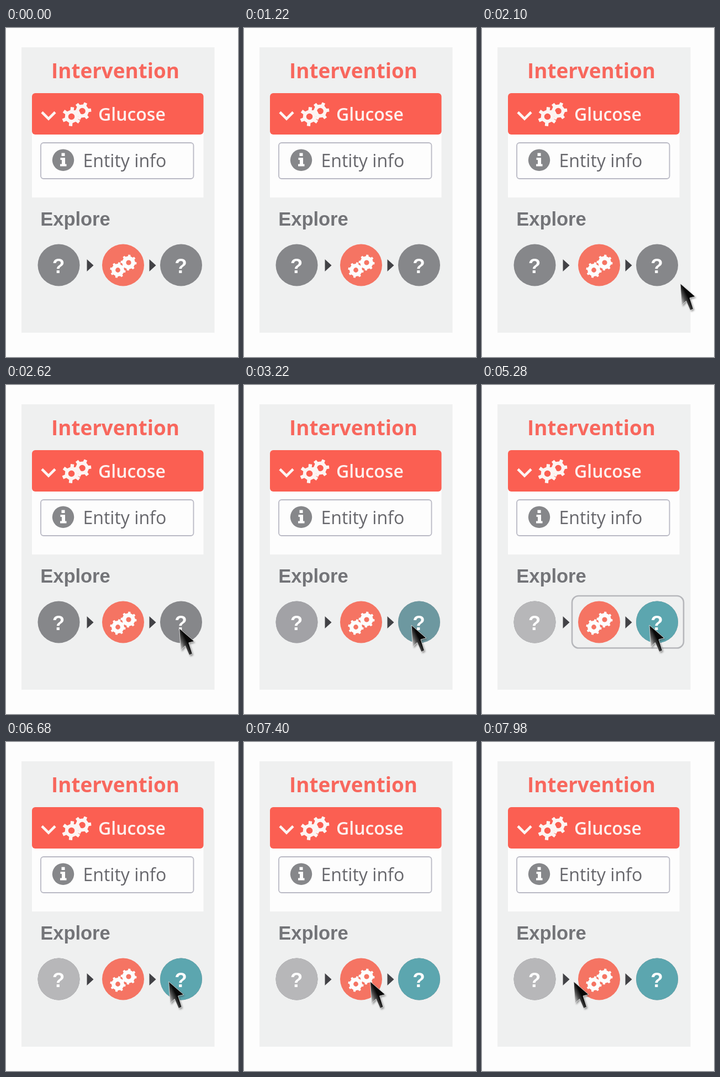
Recreate the animation shown at these times as an HTML page. Size 420x596 px, loop 8000 ms.

```html
<!DOCTYPE html>
<html lang="en">
<head>
<meta charset="utf-8">
<title>Intervention panel</title>
<style>
html, body { margin: 0; width: 100%; height: 100%; overflow: hidden; background: #fdfdfd; }
svg { display: block; width: 100vw; height: 100vh; }
.sans { font-family: "Open Sans", "Noto Sans", sans-serif; }
.arial { font-family: "Liberation Sans", Arial, sans-serif; font-weight: 700; }
.q { font-size: 37px; text-anchor: middle; fill: #fdfdfd; }
</style>
</head>
<body>
<svg viewBox="0 0 420 596" xmlns="http://www.w3.org/2000/svg">
  <defs>
    <linearGradient id="ink" gradientUnits="userSpaceOnUse" x1="0" y1="28" x2="16" y2="20">
      <stop offset="0" stop-color="#b4b4b4"/>
      <stop offset=".4" stop-color="#4c4c4c"/>
      <stop offset=".8" stop-color="#080808"/>
    </linearGradient>
    <filter id="soft" x="-50%" y="-50%" width="200%" height="200%">
      <feGaussianBlur stdDeviation="1.6"/>
    </filter>
    <path id="arrow" d="M0 0L27 23.5L17 26L23.5 46L18 48.5L10.5 31.5L2.5 39.5z"/>
  </defs>
  <rect width="420" height="596" fill="#fdfdfd"/>
  <rect x="28" y="35" width="349.5" height="517" fill="#eff0f0"/>
  <text class="sans" x="198" y="91" font-size="36.8" font-weight="700" text-anchor="middle" fill="#f8675d">Intervention</text>

  <rect x="47" y="190" width="310.5" height="117" fill="#fdfdfd"/>
  <rect x="47" y="118" width="310.5" height="75" rx="6" fill="#fb5f52"/>
  <path d="M65 152.5L77 164.5L89 152.5" fill="none" stroke="#fdf4f2" stroke-width="4.6"/>
  <path id="barGears" fill="#fdf4f2"/>
  <text class="sans" x="167" y="167.5" font-size="32" font-weight="600" fill="#fdf1ef">Glucose</text>

  <rect x="63" y="208" width="276.5" height="65" rx="5" fill="#fdfdfd" stroke="#b9b9c4" stroke-width="1.8"/>
  <circle cx="103.5" cy="239.3" r="19.7" fill="#86878a"/>
  <path d="M100.5 226.500h6v5.500h-6zM98.500 235h8.500v11.500h2.500v4h-11.500v-4h3v-7.500h-2.500z" fill="#fdfdfd"/>
  <text class="sans" x="139.5" y="251.5" font-size="32.1" fill="#67676c">Entity info</text>

  <text class="arial" x="62.2" y="358" font-size="34.5" fill="#737478">Explore</text>

  <rect id="outline" x="163" y="382" width="202" height="94.5" rx="12" fill="none" stroke="#b6b7bb" stroke-width="2.6"/>
  <g fill="#86878a">
    <circle cx="95.5" cy="429.5" r="38"/>
    <circle cx="317" cy="429.5" r="38"/>
  </g>
  <g id="picked">
    <circle cx="95.5" cy="429.5" r="38" fill="#b7b7b9"/>
    <circle cx="317" cy="429.5" r="38" fill="#5ca6af"/>
  </g>
  <circle cx="212" cy="429.5" r="38" fill="#f57463"/>
  <path id="diskGears" fill="#fdfdfd"/>
  <path d="M146.5 419L158.5 430L146.5 441zM259.5 419L271.5 430L259.5 441z" fill="#424246"/>
  <text class="arial q" x="95" y="443.5">?</text>
  <text class="arial q" x="316.5" y="443.5">?</text>

  <g id="cursor">
    <use href="#arrow" x="2" y="2.5" fill="#333" opacity=".45" filter="url(#soft)"/>
    <use href="#arrow" fill="url(#ink)" stroke="#eee" stroke-width=".8" stroke-linejoin="round"/>
  </g>
</svg>
<script>
const $ = id => document.getElementById(id);
const LOOP = 8000, BEAT = 420, HOLD = 100, STEP = 20, STEPS = 17;

// Toothed ring; the hole runs against the rim so it stays open.
function gear(cx, cy, tip, root, hole, n, turn) {
  const pitch = 2 * Math.PI / n, pts = [];
  for (let i = 0; i < n; i++)
    for (const [off, r] of [[-.25, root], [-.17, tip], [.17, tip], [.25, root]]) {
      const a = turn + (i + off) * pitch;
      pts.push((cx + r * Math.cos(a)).toFixed(2) + " " + (cy + r * Math.sin(a)).toFixed(2));
    }
  const arc = `a${hole} ${hole} 0 1 0 `;
  return `M${pts.join("L")}zM${cx - hole} ${cy}${arc}${2 * hole} 0${arc}${-2 * hole} 0z`;
}
$("barGears").setAttribute("d", gear(118.5, 160.5, 17.5, 12, 5.8, 6, .62) + gear(138, 150.5, 16.5, 12, 5.8, 6, -.12));
$("diskGears").setAttribute("d", gear(202.5, 438.5, 14.2, 11.5, 4.4, 8, .2) + gear(222, 425, 14.5, 11.8, 4.6, 8, .1));

// Cursor stops: [beat, x, y]
const route = [
  [3, 449, 507], [5, 359, 463], [6, 314.5, 441.3], [7, 303, 435],
  [15, 303, 435], [16, 293.5, 434], [19, 166, 434], [20, 124, 434]
];

// Time in beats: a pause, then even steps to the next stop.
function beatAt(t) {
  const u = t % BEAT;
  const step = u < HOLD ? 0 : Math.floor((u - HOLD) / STEP) + 1;
  return Math.floor(t / BEAT) + step / STEPS;
}

const ramp = (b, from) => Math.min(1, Math.max(0, b - from));

function cursorAt(b) {
  if (b <= route[0][0]) return route[0].slice(1);
  const i = route.findIndex(s => s[0] >= b);
  const [b0, x0, y0] = route[i - 1], [b1, x1, y1] = route[i];
  const p = (b - b0) / (b1 - b0);
  return [x0 + (x1 - x0) * p, y0 + (y1 - y0) * p];
}

function draw(t) {
  const b = beatAt(t), [x, y] = cursorAt(b);
  $("cursor").setAttribute("transform", `translate(${x} ${y})`);
  $("picked").setAttribute("opacity", ramp(b, 7));
  $("outline").setAttribute("opacity", ramp(b, 8) - ramp(b, 13));
}

const start = performance.now();
function tick() {
  draw((performance.now() - start) % LOOP);
  requestAnimationFrame(tick);
}
tick();
</script>
</body>
</html>
```
